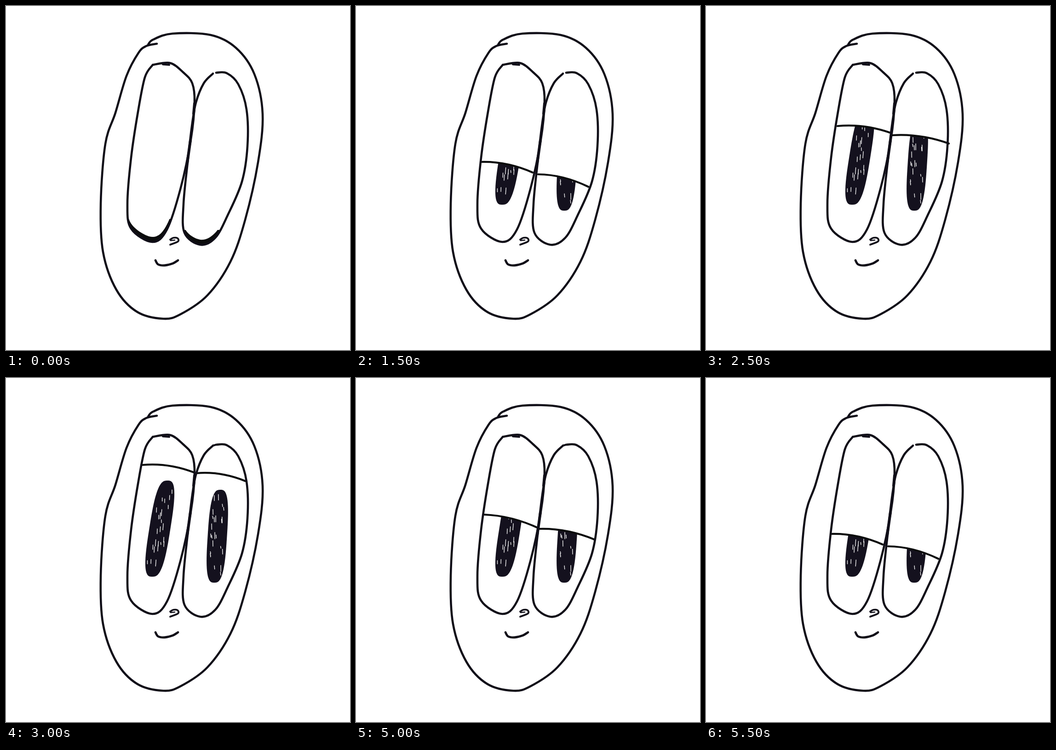
Write an HTML page with a canvas that moves like this. It is 748 px wide and 748 px high and loops after 6000 ms.

```html
<!DOCTYPE html>
<html lang="en">
<head>
<meta charset="utf-8">
<title>Sleepy face</title>
<style>
  html, body { margin: 0; width: 100%; height: 100%; overflow: hidden; background: #fff; }
  canvas { display: block; width: 100vw; height: 100vh; }
</style>
</head>
<body>
<canvas id="stage" width="748" height="748"></canvas>
<script>
const SIZE = 748, SLOT = 500, SLOTS = 12;
const INK = '#100e18', BLACK = '#0b0c0c', PUPIL = '#14111e';
const ctx = document.getElementById('stage').getContext('2d');

// Key points, joined by a smooth curve.
const head = [[309, 84], [320, 73], [362, 60], [445, 63], [500, 91], [540, 148], [558, 235],
  [548, 340], [520, 465], [488, 556], [438, 629], [380, 670], [342, 680], [285, 665], [240, 617],
  [211, 535], [206, 430], [216, 300], [238, 232], [262, 152], [288, 102], [305, 87], [328, 82]];

// Lids run from [x, y] to [x, y], from nearly shut to wide open.
const eyes = [
  {
    outline: [[319, 128], [357, 124], [385, 144], [405, 168], [410, 210], [402, 290], [380, 395],
      [350, 486], [318, 513], [272, 484], [264, 430], [272, 330], [287, 230], [302, 155], [319, 128]],
    pupil: { top: [351, 223], bottom: [318, 432], half: 23, seed: 7 },
    lids: [[272, 339, 384, 362], [278, 297, 398, 327], [286, 261, 402, 276], [297, 189, 408, 205]],
    shadowTop: 463
  },
  {
    outline: [[457, 145], [480, 146], [505, 170], [523, 225], [525, 305], [513, 382], [482, 455],
      [455, 504], [422, 519], [388, 493], [386, 430], [395, 340], [404, 262], [413, 210],
      [430, 168], [450, 147]],
    pupil: { top: [466, 243], bottom: [453, 445], half: 21, seed: 19 },
    lids: [[396, 366, 505, 393], [399, 328, 518, 351], [405, 281, 528, 299], [414, 207, 520, 224]],
    shadowTop: 487
  }
];

function random(seed) {
  return () => (seed = (seed * 16807) % 2147483647) / 2147483647;
}

function smooth(points) {
  const path = new Path2D(), last = points.length - 1;
  const at = i => points[Math.max(0, Math.min(last, i))];
  path.moveTo(...points[0]);
  for (let i = 0; i < last; i++) {
    const [a, b, c, d] = [at(i - 1), at(i), at(i + 1), at(i + 2)];
    path.bezierCurveTo(b[0] + (c[0] - a[0]) / 6, b[1] + (c[1] - a[1]) / 6,
      c[0] - (d[0] - b[0]) / 6, c[1] - (d[1] - b[1]) / 6, ...c);
  }
  return path;
}

function stroke(path, width, color = INK) {
  ctx.lineWidth = width;
  ctx.strokeStyle = color;
  ctx.stroke(path);
}

function fill(path, color) {
  ctx.fillStyle = color;
  ctx.fill(path);
}

// Maps (-1..1 across, -1..1 along) onto the slanted pupil.
function pupilPoint({ top, bottom, half }, across, along) {
  const k = (along + 1) / 2;
  return [top[0] + (bottom[0] - top[0]) * k + across * half, top[1] + (bottom[1] - top[1]) * k];
}

function pupilShape(pupil) {
  const path = new Path2D(), round = v => Math.sign(v) * Math.abs(v) ** (2 / 3);
  for (let a = 0; a < Math.PI * 2; a += 0.05) {
    path.lineTo(...pupilPoint(pupil, round(Math.cos(a)), round(Math.sin(a))));
  }
  path.closePath();
  return path;
}

// Thin uncoloured strokes left between the pen marks.
function scratches(pupil) {
  const path = new Path2D(), rnd = random(pupil.seed);
  for (let i = 0; i < 24; i++) {
    const across = rnd() * 1.4 - 0.7, along = rnd() * 1.7 - 0.9;
    path.moveTo(...pupilPoint(pupil, across, along));
    path.lineTo(...pupilPoint(pupil, across + 0.05, along + 0.04 + rnd() * 0.1));
  }
  return path;
}

function lidPath([x0, y0, x1, y1]) {
  const path = new Path2D();
  path.moveTo(x0, y0);
  path.quadraticCurveTo((x0 + x1) / 2, (y0 + y1) / 2 - 13, x1, y1);
  return path;
}

function drawOpenEye(eye, level) {
  const lid = eye.lids[level - 1];
  const below = lidPath(lid), shape = pupilShape(eye.pupil);
  below.lineTo(lid[2], SIZE);
  below.lineTo(lid[0], SIZE);
  ctx.save();
  ctx.clip(below);
  fill(shape, PUPIL);
  stroke(scratches(eye.pupil), 1.4, '#f4f4f4');
  ctx.restore();
  stroke(lidPath(lid), 4.2, BLACK);
}

// The shadow is the part of the eye that its own raised copy leaves uncovered.
function drawShutEye(eye) {
  const shape = smooth(eye.outline), area = new Path2D();
  area.rect(0, eye.shadowTop, SIZE, SIZE);
  ctx.save();
  ctx.clip(area);
  ctx.clip(shape);
  fill(shape, BLACK);
  ctx.translate(0, -11);
  fill(shape, '#fff');
  ctx.restore();
}

function draw(level) {
  ctx.fillStyle = '#fff';
  ctx.fillRect(0, 0, SIZE, SIZE);
  ctx.lineCap = ctx.lineJoin = 'round';

  for (const eye of eyes) {
    if (level) drawOpenEye(eye, level);
    else drawShutEye(eye);
    stroke(smooth(eye.outline), 4.6);
  }
  stroke(smooth(head), 4.6);
  stroke(smooth([[341, 127], [355, 128]]), 4);
  stroke(smooth([[410, 212], [408, 234]]), 6);
  stroke(smooth([[401, 292], [394, 342]]), 6);
  // The pen gap above the right eye closes on every second drawing.
  if (level && level % 2 === 0) stroke(smooth([[450, 147], [457, 145]]), 4);

  stroke(smooth([[357, 508], [364, 504], [373, 505], [374, 512], [357, 519]]), 3.8);
  stroke(smooth([[358, 510], [367, 509]]), 2.6);
  stroke(smooth([[325, 553], [331, 562], [345, 564], [362, 560], [374, 553]]), 4.8);
}

const start = performance.now();
function tick() {
  const slot = Math.floor((performance.now() - start) / SLOT) % SLOTS;
  // Lids rise one step per slot, hold wide open, then sink again.
  draw(Math.max(0, Math.min(4, slot - 2, SLOTS - slot)));
  requestAnimationFrame(tick);
}
tick();
</script>
</body>
</html>
```
